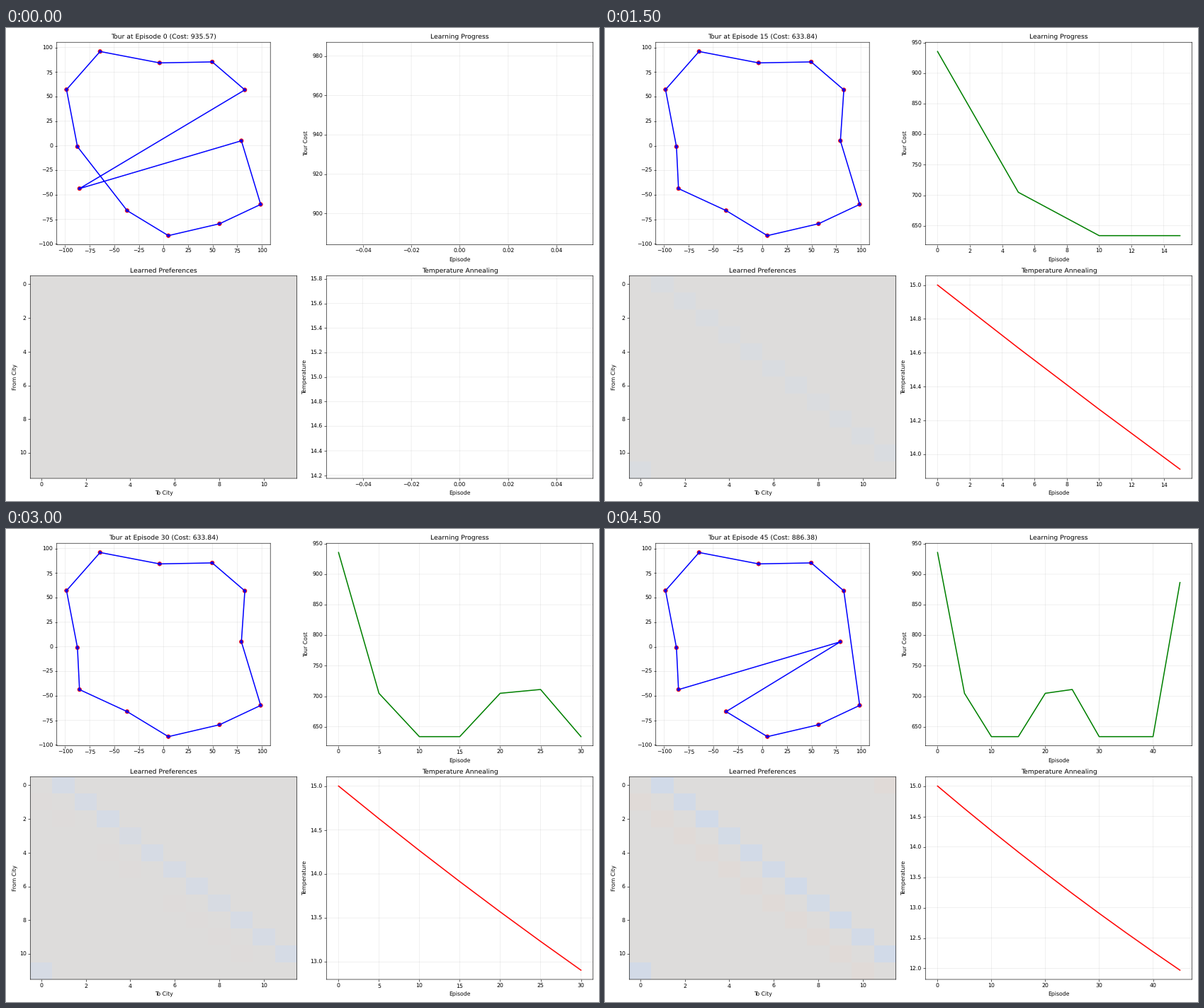
Recreate the animation shown at these times as a matplotlib script. Size 837 px wide and 669 px high, loop 5000 ms.

```python
import numpy as np
import matplotlib.pyplot as plt
from matplotlib.animation import FuncAnimation

W, H, DPI = 837, 669, 55.75
LAYOUT_DPI = 100
STEPS, STRIDE, N = 10, 5, 12

plt.rcParams.update({"font.family": "DejaVu Sans", "text.hinting": "none",
                     "path.snap": False})

CITIES = np.array([
    (-98.5, 57.2), (-64.4, 96.0), (-3.9, 84.4), (49.6, 85.4),
    (82.7, 56.9), (79.2, 5.1), (98.8, -59.7), (57.0, -79.4),
    (5.0, -91.5), (-36.9, -66.0), (-85.3, -43.6), (-87.4, -0.9),
])

# Steps whose tour strays from the best one: city, its new place, tour cost
BEST = 633.84
STRAYS = {0: (10, 5, 935.57), 1: (4, 3, 704.86), 4: (4, 3, 704.86),
          5: (1, 0, 711.11), 9: (5, 9, 886.38)}

episodes = STRIDE * np.arange(STEPS)
temps = 15 * 0.995 ** episodes
costs = [STRAYS[k][2] if k in STRAYS else BEST for k in range(STEPS)]
spread = np.random.default_rng(4).uniform(0.88, 1.1, (2, N))

# The tiny surplus keeps the pixel size from being rounded down
fig, axes = plt.subplots(2, 2, dpi=DPI,
                         figsize=((W + 1e-4) / DPI, (H + 1e-4) / DPI))
tour_ax, cost_ax, pref_ax, temp_ax = axes.flat


def tour(step):
    order = list(range(N))
    if step in STRAYS:
        city, place, _ = STRAYS[step]
        order.remove(city)
        order.insert(place, city)
    return order


def preferences(step):
    """Forward links grow steadily, backward links fade in late."""
    grid = np.zeros((N, N))
    i = np.arange(N)
    grid[i, (i + 1) % N] = -0.0085 * step * spread[0]
    grid[i, (i - 1) % N] = 0.027 * (step / 9) ** 3 * spread[1]
    return grid


def dots(ax, color, size, **style):
    # One colour per dot keeps the dots off the whole-pixel grid
    ax.scatter(*CITIES.T, c=[color] * N, s=size, **style)


def draw_tour(step):
    order = tour(step)
    path = CITIES[order + order[:1]]
    dots(tour_ax, "red", 50)
    tour_ax.plot(*path.T, "b-", linewidth=2)
    dots(tour_ax, "blue", 30, linewidths=0, zorder=3)
    tour_ax.set_aspect("equal")
    tour_ax.grid(True, alpha=0.3)
    tour_ax.set_title(f"Tour at Episode {episodes[step]} (Cost: {costs[step]:.2f})")


def draw_history(ax, values, step, color, title, label):
    ax.plot(episodes[:step + 1], values[:step + 1], color=color, linewidth=2)
    ax.grid(True, alpha=0.3)
    ax.set(title=title, xlabel="Episode", ylabel=label)


def arrange():
    # Text is measured at a finer resolution for steadier margins
    fig.set_dpi(LAYOUT_DPI)
    fig.tight_layout()
    fig.set_dpi(DPI)


def draw(step):
    for ax in axes.flat:
        ax.clear()
    draw_tour(step)
    draw_history(cost_ax, costs, step, "g", "Learning Progress", "Tour Cost")
    pref_ax.imshow(preferences(step), cmap="coolwarm", vmin=-1, vmax=1,
                   aspect="auto", interpolation="nearest")
    pref_ax.set(title="Learned Preferences", xlabel="To City", ylabel="From City")
    draw_history(temp_ax, temps, step, "r", "Temperature Annealing", "Temperature")
    arrange()
    return list(axes.flat)


anim = FuncAnimation(fig, draw, frames=STEPS, init_func=lambda: draw(0),
                     interval=500, repeat=True, repeat_delay=0, blit=False)
plt.show()
```
